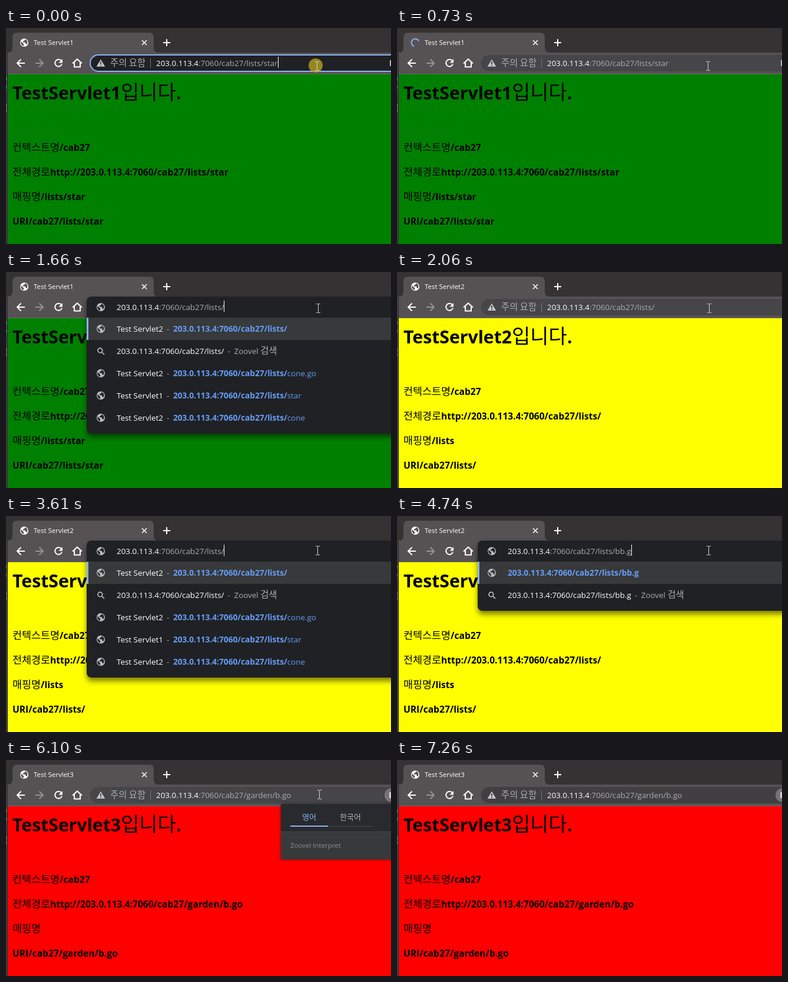
Animation of 654x369 px, one loop 7.33 s. Source, as an HTML page with a canvas:

```html
<!DOCTYPE html>
<html lang="ko">
<head>
<meta charset="utf-8">
<title>Servlet mapping demo</title>
<style>
html, body { margin: 0; width: 100%; height: 100%; overflow: hidden; background: #353233; }
canvas { display: block; }
</style>
</head>
<body>
<canvas id="stage" width="654" height="369"></canvas>
<script>
const ctx = document.getElementById('stage').getContext('2d');
const W = 654, H = 369, LOOP = 7330;
const HOST = '203.0.113.4', ROOT = ':7060/cab27/', ENGINE = 'Zoovel';
const WHITE = '#ffffff', GREY = '#abadb2', BLUE = '#669df6', DARK = '#202124', CHROME = '#565253';

// Latin size, Hangul size, Latin weight
const UI = [13.4, 15.4, 400], UI_BOLD = [13.7, 15.4, 700], TAB = [11.5, 13, 400];
const BODY = [15.6, 17.4, 700], HEAD = [30.2, 34, 700], SMALL = [11.5, 13, 400], SMALL_BOLD = [11.5, 13, 700];

const pick = (t, steps) => steps.filter(([from]) => t >= from).pop()[1];
const ramp = (t, a, b) => Math.max(0, Math.min(1, (t - a) / (b - a)));
const between = (t, a, b) => t >= a && t < b;

function rect(x, y, w, h, color) {
  ctx.fillStyle = color;
  ctx.fillRect(x, y, w, h);
}

function roundRect(x, y, w, h, r, color) {
  ctx.beginPath();
  ctx.roundRect(x, y, w, h, r);
  ctx.fillStyle = color;
  ctx.fill();
}

function disc(x, y, r, color) {
  ctx.beginPath();
  ctx.arc(x, y, r, 0, 7);
  ctx.fillStyle = color;
  ctx.fill();
}

function stroke(d, color, width = 2, x = 0, y = 0) {
  ctx.save();
  ctx.translate(x, y);
  ctx.strokeStyle = color;
  ctx.lineWidth = width;
  ctx.stroke(new Path2D(d));
  ctx.restore();
}

function fillPath(d, color, x, y) {
  ctx.save();
  ctx.translate(x, y);
  ctx.fillStyle = color;
  ctx.fill(new Path2D(d));
  ctx.restore();
}

const latinFont = ([size, , weight]) => `${weight} ${size}px "Open Sans", "Noto Sans", sans-serif`;
const hangulFont = ([, size, weight]) =>
  `${weight > 400 ? 500 : 400} ${size}px "Noto Sans CJK KR", "Noto Sans CJK", sans-serif`;

// Draws mixed Latin and Hangul text and returns the x where it ends.
function text(str, x, y, style, color) {
  ctx.fillStyle = color;
  for (const run of str.match(/[가-힣]+|[^가-힣]+/g) || []) {
    ctx.font = /[가-힣]/.test(run) ? hangulFont(style) : latinFont(style);
    ctx.fillText(run, x, y);
    x += ctx.measureText(run).width;
  }
  return x;
}

function width(str, style) {
  ctx.font = latinFont(style);
  return ctx.measureText(str).width;
}

function globe(x, y, color, land) {
  disc(x, y, 7, color);
  fillPath('M-5.5 -2 L-1 2.2 L-1 5.8 Q-5.5 4.5 -5.8 0Z M1 -5.7 L1 -4 L-2 -2.5 L-2 -.5 L2 -.5 L2.5 2 L4.3 3 Q6.6 -.5 4.5 -3.8 Q3 -5.4 1 -5.7Z', land, x, y);
}

const PAGES = {
  green: { n: 1, color: '#008000', path: 'lists/star', mapping: '/lists/star' },
  yellow: { n: 2, color: '#ffff00', path: 'lists/', mapping: '/lists' },
  yellowFile: { n: 2, color: '#ffff00', path: 'lists/bb.go', mapping: '/lists' },
  red: { n: 3, color: '#ff0000', path: 'garden/b.go', mapping: '' }
};

const pageAt = t => PAGES[pick(t, [[0, 'green'], [1990, 'yellow'], [5140, 'yellowFile'], [5890, 'red']])];

const barModeAt = t => pick(t, [
  [0, 'caret'], [130, 'all'], [600, 'idle'], [1270, 'last'], [1600, 'open'], [1920, 'idle'],
  [2990, 'caret'], [3060, 'all'], [3200, 'caret'], [3610, 'open'], [5140, 'idle'], [5290, 'open'], [5820, 'idle']
]);

const typedAt = t => pick(t, [
  [0, 'lists/star'], [1600, 'lists/'], [3810, 'lists/b'], [4080, 'lists/bb'], [4410, 'lists/bb.'],
  [4740, 'lists/bb.g'], [4870, 'lists/bb.go'], [5290, 'garden/b.go']
]);

function drawFrame() {
  rect(0, 0, W, H, '#353233');
  rect(0, 42, 3, H, '#414043');
  rect(2, 42, 1, H, '#2c2b2d');
  for (const y of [84, 98, 130, 138]) rect(0, y, 1, 6, '#8a8a8c');
}

function drawTab(t, page) {
  fillPath('M3 42 Q11 42 11 34 V16 Q11 8 19 8 H243 Q251 8 251 16 V34 Q251 42 259 42Z', CHROME, 0, 0);
  if (between(t, 600, 740)) {
    ctx.beginPath();
    ctx.arc(31, 25, 6.5, t / 90, t / 90 + 4);
    ctx.strokeStyle = '#8ab4f8';
    ctx.lineWidth = 2;
    ctx.stroke();
  } else globe(31, 25, WHITE, CHROME);
  text('Test Servlet' + page.n, 47, 29, TAB, WHITE);
  stroke('M-4 -4 L4 4 M4 -4 L-4 4', WHITE, 1.6, 235, 25);
  stroke('M-6 0 H6 M0 -6 V6', WHITE, 2, 273, 25);
}

function drawToolbar(t) {
  rect(3, 42, W, 36, CHROME);
  rect(3, 78, W, 1, '#6d696a');
  const arrow = 'M7 0 H-6 M.5 -6.5 L-6 0 L.5 6.5';
  stroke(arrow, WHITE, 2, 25, 60);
  ctx.save();
  ctx.translate(57, 60);
  ctx.scale(-1, 1);
  stroke(arrow, between(t, 5140, 5820) ? WHITE : '#969394');
  ctx.restore();
  stroke('M4.5 -4.5 A6 6 0 1 0 6 1.5', WHITE, 2, 89, 60);
  fillPath('M7 -7 V-.5 H.5Z', WHITE, 89, 60);
  stroke('M-8 .5 L0 -6.8 L8 .5 M-5 -1.5 V6.5 H5 V-1.5', WHITE, 2, 121, 60);
}

function drawPage(page) {
  rect(3, 79, W, H, page.color);
  text(`TestServlet${page.n}입니다.`, 11, 122, HEAD, '#000');
  [
    '컨텍스트명/cab27',
    `전체경로http://${HOST}${ROOT}${page.path}`,
    '매핑명' + page.mapping,
    'URI/cab27/' + page.path
  ].forEach((line, i) => text(line, 11, 210 + 42 * i, BODY, '#000'));
}

function drawUrl(x, path, scheme = '') {
  x = text(scheme, x, 65, UI, GREY);
  x = text(HOST, x, 65, UI, WHITE);
  return text(ROOT + path, x, 65, UI, GREY);
}

function drawCaret(x) {
  rect(Math.round(x), 49, 1, 19, '#fff');
}

function drawBar(t, mode, path) {
  const focused = mode !== 'idle';
  roundRect(142, 45, 540, 30, 15, focused ? '#8ab4f8' : CHROME);
  roundRect(focused ? 144 : 143, focused ? 47 : 46, 540, focused ? 26 : 28, 14,
    focused ? DARK : t > 6850 ? '#413f41' : '#464547');
  fillPath('M0 -6.5 L7.3 6 H-7.3Z', '#c3c4c7', 161, 60);
  rect(160.2, 57.5, 1.6, 4, DARK);
  rect(160.2, 63, 1.6, 1.6, DARK);
  text('주의 요함', 177, 65, UI, GREY);
  rect(245, 52, 1, 16, '#77787b');
  const end = drawUrl(255, path);
  if (mode === 'caret') drawCaret(end);
  if (mode === 'all' || mode === 'last') {
    const picked = mode === 'all' ? HOST + ROOT + path : path.split('/').pop();
    const x = end - width(picked, UI);
    rect(x, 49, end - x, 22, '#566b91');
    text(picked, x, 65, UI, '#fff');
  }
  if (t < 1600) rect(652, 55, 2, 10, '#b9babd');
  if (t >= 5890) {
    disc(655, 60, 12, '#767476');
    rect(651, 55, 3, 10, '#d0d0d2');
  }
}

function drawSuggestions(t, typed) {
  const full = t >= 5290;
  const scheme = full ? 'http://' : '';
  const address = scheme + HOST + ROOT + typed;
  const listing = typed === 'lists/';
  const rows = listing ? 5 : 2;

  ctx.save();
  ctx.shadowColor = 'rgba(0,0,0,.5)';
  ctx.shadowBlur = 10;
  ctx.shadowOffsetY = 6;
  roundRect(137, 42, 560, 44 + rows * 38, 8, DARK);
  ctx.restore();
  rect(137, 78, W, 38, '#38393b');
  rect(137, 78, 3, 38, '#8ab4f8');

  globe(161, 60, '#b6bdc2', DARK);
  const end = drawUrl(188, typed, scheme);
  if (t < 5490) drawCaret(end);

  const dash = (x, y) => {
    text('-', x + 6, y, UI, GREY);
    return x + 17;
  };

  const suggestion = (row, title, bold, rest = '') => {
    const y = 97 + row * 38;
    globe(161, y, '#b6bdc2', row ? DARK : '#38393b');
    let x = 188;
    if (title) x = dash(text(title, x, y + 5, UI, WHITE), y + 5);
    x = text(bold, x, y + 5, UI_BOLD, BLUE);
    text(rest, x, y + 5, UI, BLUE);
  };

  suggestion(0, listing ? 'Test Servlet2' : full ? 'Test Servlet3' : '', address);
  stroke('M2.8 -1 A3.9 3.9 0 1 0 -5 -1 A3.9 3.9 0 1 0 2.8 -1 M1.6 1.8 L6 6.2', '#b6bdc2', 1.7, 161, 135);
  const x = dash(text(address, 188, 140, UI, WHITE), 140);
  text(ENGINE + ' 검색', x, 140, UI, GREY);
  if (listing) {
    suggestion(2, 'Test Servlet2', address, 'cone.go');
    suggestion(3, 'Test Servlet1', address, 'star');
    suggestion(4, 'Test Servlet2', address, 'cone');
  }
}

function drawTranslatePopup(alpha) {
  if (!alpha) return;
  ctx.save();
  ctx.globalAlpha = alpha;
  ctx.save();
  ctx.shadowColor = 'rgba(0,0,0,.5)';
  ctx.shadowBlur = 5;
  roundRect(467, 75, 200, 95, 4, '#38393b');
  ctx.restore();
  roundRect(467, 75, 200, 47, [4, 4, 0, 0], '#292a2d');
  rect(467, 122, 200, 1, '#444548');
  text('영어', 503, 102, SMALL_BOLD, '#8ab4f8');
  text('한국어', 567, 102, SMALL, '#b4b7bb');
  rect(483, 113, 140, 1, '#47494c');
  rect(483, 112, 64, 2, '#8ab4f8');
  text(ENGINE + ' Interpret', 483, 150, SMALL, '#8b8d90');
  ctx.restore();
}

function drawPointer(t) {
  if (t >= 7190) return;
  const fall = ramp(t, 6740, 6990);
  const [x, y] = t >= 6780 ? [532 + 8 * fall, 59 + 258 * fall]
    : pick(t, [[0, [528, 65]], [800, [530, 62]], [3610, [529, 59]], [5140, [532, 59]]]);
  const pressed = t < 60 || between(t, 2990, 3060) || between(t, 3130, 3200) || between(t, 6990, 7050);
  if (pressed) disc(x - 2, y - 1, 12, 'rgba(190,168,30,.75)');
  if (y > 78) {
    const arrow = 'M0 0 V16 L3.8 12.5 L6.3 18 L8.8 17 L6.4 11.5 H11.5Z';
    fillPath(arrow, '#fff', x, y - 8);
    stroke(arrow, '#000', 1, x, y - 8);
  } else {
    stroke('M-3.5 -7.5 H-.5 M.5 -7.5 H3.5 M0 -7 V7 M-3.5 7.5 H-.5 M.5 7.5 H3.5', '#d8d8d8', 1, Math.floor(x) + .5, y);
  }
}

function draw(t) {
  const page = pageAt(t), mode = barModeAt(t);
  drawFrame();
  drawTab(t, page);
  drawToolbar(t);
  drawPage(page);
  if (mode === 'open') drawSuggestions(t, typedAt(t));
  else drawBar(t, mode, between(t, 1920, 1990) ? 'lists/' : t >= 5820 ? 'garden/b.go' : page.path);
  drawTranslatePopup(t < 1270 ? ramp(t, 740, 940) : ramp(t, 5890, 6100) * (1 - ramp(t, 6920, 7050)));
  drawPointer(t);
}

function tick() {
  draw(performance.now() % LOOP);
  requestAnimationFrame(tick);
}
tick();
</script>
</body>
</html>
```
